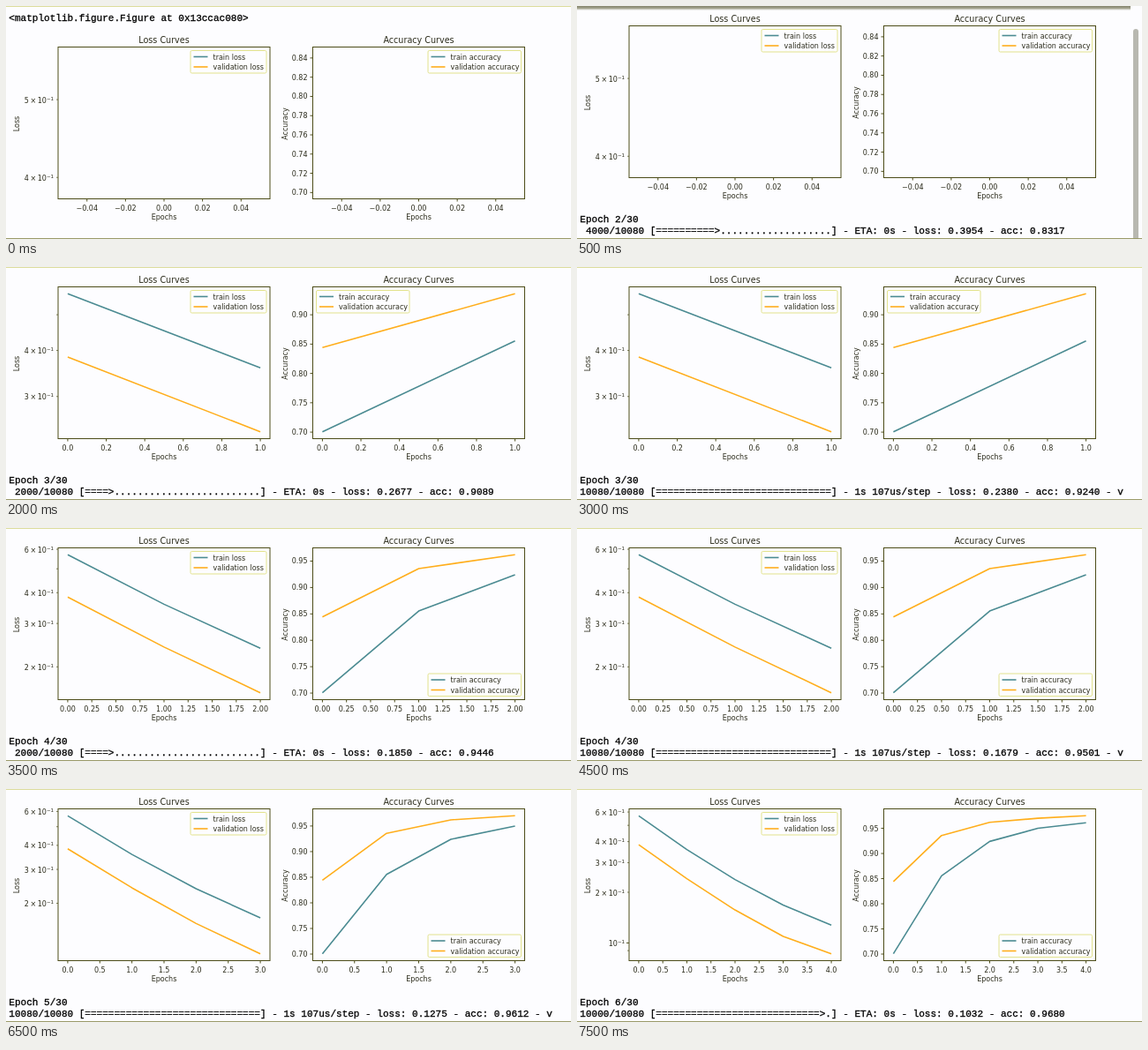
An HTML page for the animation above (8 s loop, 640x264 px).

```html
<!DOCTYPE html>
<html lang="en">
<head>
<meta charset="utf-8">
<title>Training curves</title>
<style>
  html, body { margin: 0; width: 100%; height: 100%; overflow: hidden; background: #fdfdff; }
  svg { display: block; width: 640px; height: 264px; }
  text { font: 8px "DejaVu Sans", sans-serif; fill: #2c2c1c; white-space: pre; }
  .title { font-size: 9.6px; }
  .sup { font-size: 5.6px; }
  .mono { font: 11.04px "Liberation Mono", monospace; fill: #000; stroke: #000; stroke-width: .3px; }
  .mid { text-anchor: middle; }
  .end { text-anchor: end; }
  .axis { fill: none; stroke: #4c4c18; stroke-width: 1; }
  .minor { stroke-width: .7; }
  .legend { fill: #fdfdff; stroke: #e2e28c; stroke-width: 1; }
  .line { fill: none; stroke-width: 1.6; stroke-linejoin: round; }
  .train { stroke: #4b8b92; }
  .valid { stroke: #ffae1c; }
</style>
</head>
<body>
<svg id="stage" viewBox="0 0 640 264">
  <defs>
    <linearGradient id="shade" x2="0" y2="1">
      <stop stop-color="#84846c"/><stop offset=".5" stop-color="#a4a48e"/><stop offset="1" stop-color="#fdfdff"/>
    </linearGradient>
  </defs>
  <g id="view"></g>
</svg>
<script>
const STEP = 500, TOTAL = 10080;
const TOP = 22.5, WIDTH = 240, HEIGHT = 172, PAD_X = WIDTH / 22, PAD_Y = HEIGHT / 22;

const LOSS = {
  name: 'Loss', key: 'loss', left: 59, labelX: 15, log: true,
  train: [.57, .359, .238, .1679, .1275],
  valid: [.3837, .2407, .157, .1093, .0862]
};
const ACC = {
  name: 'Accuracy', key: 'accuracy', left: 347.5, labelX: 318.5, log: false,
  train: [.7006, .8555, .924, .95, .9612],
  valid: [.8442, .9358, .962, .97, .975]
};

// last plotted epoch, running epoch, samples done, loss, accuracy
const STATES = [
  [0],
  [0, 2, 4000, .3954, .8317],
  [0, 2, 8000, .3718, .8498],
  [0, 2, TOTAL, .3590, .8555],
  [1, 3, 2000, .2677, .9089],
  [1, 3, 6000, .2524, .9170],
  [1, 3, TOTAL, .2380, .9240],
  [2, 4, 2000, .1850, .9446],
  [2, 4, 6000, .1765, .9472],
  [2, 4, TOTAL, .1679, .9501],
  [3, 5],
  [3, 5, 6000, .1314, .9604],
  [3, 5, 10000, .1277, .9611],
  [3, 5, TOTAL, .1275, .9612],
  [4, 6, 4000, .1061, .9672],
  [4, 6, 10000, .1032, .9680]
];

const text = (x, y, s, cls = '', extra = '') => `<text x="${x}" y="${y}" class="${cls}" ${extra}>${s}</text>`;
const path = (d, cls) => `<path d="${d}" class="${cls}"/>`;
const rect = (x, y, w, h, attrs) => `<rect x="${x}" y="${y}" width="${w}" height="${h}" ${attrs}/>`;
const signed = (v, digits) => v.toFixed(digits).replace('-', '\u2212');

function ticksX(n) {
  const [step, from, to, digits] = [[.02, -2, 2, 2], [.2, 0, 5, 1], [.25, 0, 8, 2], [.5, 0, 6, 1], [.5, 0, 8, 1]][n];
  const list = [];
  for (let i = from; i <= to; i++) list.push([i * step, signed(i * step, digits)]);
  return list;
}

function power(k, right, y) {
  const base = right - 8.3;
  return text(right, y - 3, '\u22121', 'end sup') + text(base, y, '10', 'end') +
    (k > 1 ? text(base - 15.1, y, '\u00d7', 'mid') + text(base - 20, y, k, 'end') : '');
}

function logTicks(left, n, y) {
  const shown = [[5, 4], [4, 3], [6, 4, 3, 2], [6, 4, 3, 2], [6, 4, 3, 2, 1]][n];
  let out = '';
  const mark = (v, k) => {
    const py = y(v);
    if (py < TOP || py > TOP + HEIGHT) return;
    out += path(`M${left} ${py}h${k === 1 ? -3 : -2}`, 'axis' + (k === 1 ? '' : ' minor'));
    if (shown.includes(k)) out += power(k, left - 4.8, py + 3.5);
  };
  for (let k = 1; k < 10; k++) mark(k / 10, k);
  mark(.09, 0);
  return out;
}

function linearTicks(left, n, y) {
  const step = n ? .05 : .02;
  let out = '';
  for (let i = 0; i < 9; i++) {
    const v = .7 + i * step, py = y(v);
    if (py < TOP) break;
    out += path(`M${left} ${py}h-3`, 'axis') + text(left - 6, py + 3, v.toFixed(2), 'end');
  }
  return out;
}

function legend(chart, n) {
  const w = chart.log ? 86 : 105.5;
  const x = !chart.log && n === 1 ? chart.left + 4 : chart.left + WIDTH - 4 - w;
  const y = !chart.log && n > 1 ? 165 : 26.5;
  const row = (cls, label, dy) =>
    path(`M${x + 3.5} ${y + dy}h16`, 'line ' + cls) + text(x + 25.5, y + dy + 3, `${label} ${chart.key}`);
  return rect(x, y, w, 25.5, 'rx="1.5" class="legend"') + row('train', 'train', 7) + row('valid', 'validation', 18.5);
}

function plot(chart, n) {
  const { left, log } = chart, scale = log ? Math.log : v => v;
  const curves = ['train', 'valid'].map(k => [k, chart[k].slice(0, n + 1)]);
  const all = curves.flatMap(c => c[1]).map(scale);
  const low = Math.min(...all), high = Math.max(...all);
  const first = n ? 0 : -.05, span = n || .1;
  const x = v => left + PAD_X + (v - first) / span * (WIDTH - 2 * PAD_X);
  const y = v => TOP + PAD_Y + (high - scale(v)) / (high - low) * (HEIGHT - 2 * PAD_Y);
  const bottom = TOP + HEIGHT, mid = left + WIDTH / 2, midY = TOP + HEIGHT / 2 + 1;
  let out = '';
  for (const [v, label] of ticksX(n))
    out += path(`M${x(v)} ${bottom}v3`, 'axis') + text(x(v), 207.5, label, 'mid');
  out += (log ? logTicks : linearTicks)(left, n, y);
  for (const [k, values] of curves)
    if (n) out += path('M' + values.map((v, i) => `${x(i)} ${y(v)}`).join('L'), 'line ' + k);
  return out + rect(left, TOP, WIDTH, HEIGHT, 'class="axis"') +
    text(mid, 18, chart.name + ' Curves', 'title mid') + text(mid, 218, 'Epochs', 'mid') +
    text(chart.labelX, midY, chart.name, 'mid', `transform="rotate(-90 ${chart.labelX} ${midY})"`) +
    legend(chart, n);
}

function progress(done, loss, acc) {
  const filled = Math.floor(30 * done / TOTAL), full = done === TOTAL;
  const bar = full ? '='.repeat(30) : '='.repeat(filled - 1) + '&gt;' + '.'.repeat(30 - filled);
  return `${String(done).padStart(5)}/${TOTAL} [${bar}] - ${full ? '1s 107us/step' : 'ETA: 0s'}` +
    ` - loss: ${loss.toFixed(4)} - acc: ${acc.toFixed(4)}${full ? ' - v' : ''}`;
}

function render(i) {
  const [n, epoch, done, loss, acc] = STATES[i];
  let out = `<g transform="translate(0 ${epoch ? 0 : 24})">${plot(LOSS, n)}${plot(ACC, n)}</g>`;
  if (!epoch) out += text(3.3, 16.5, '&lt;matplotlib.figure.Figure at 0x13ccac080&gt;', 'mono');
  else out += text(3.3, 244.5, `Epoch ${epoch}/30`, 'mono');
  if (done) out += text(3.3, 258, progress(done, loss, acc), 'mono');
  // page chrome: scroll shadow, scrollbar and cell borders
  if (i > 0 && i < 4) out += rect(0, 0, 627, 5, 'fill="url(#shade)"');
  else out += rect(0, 0, 640, 1, 'fill="#dcdc9c"');
  if (i === 1 || i === 2) out += rect(630, 26, 6, 250, 'rx="3" fill="#b8b8b0"');
  return out + rect(0, epoch && !done ? 250 : 263, 640, 1, 'fill="#9a9a68"');
}

const view = document.getElementById('view');
const start = performance.now();
let current = -1;
function tick() {
  const i = Math.floor((performance.now() - start) / STEP) % STATES.length;
  if (i !== current) view.innerHTML = render(current = i);
  requestAnimationFrame(tick);
}
tick();
</script>
</body>
</html>
```
